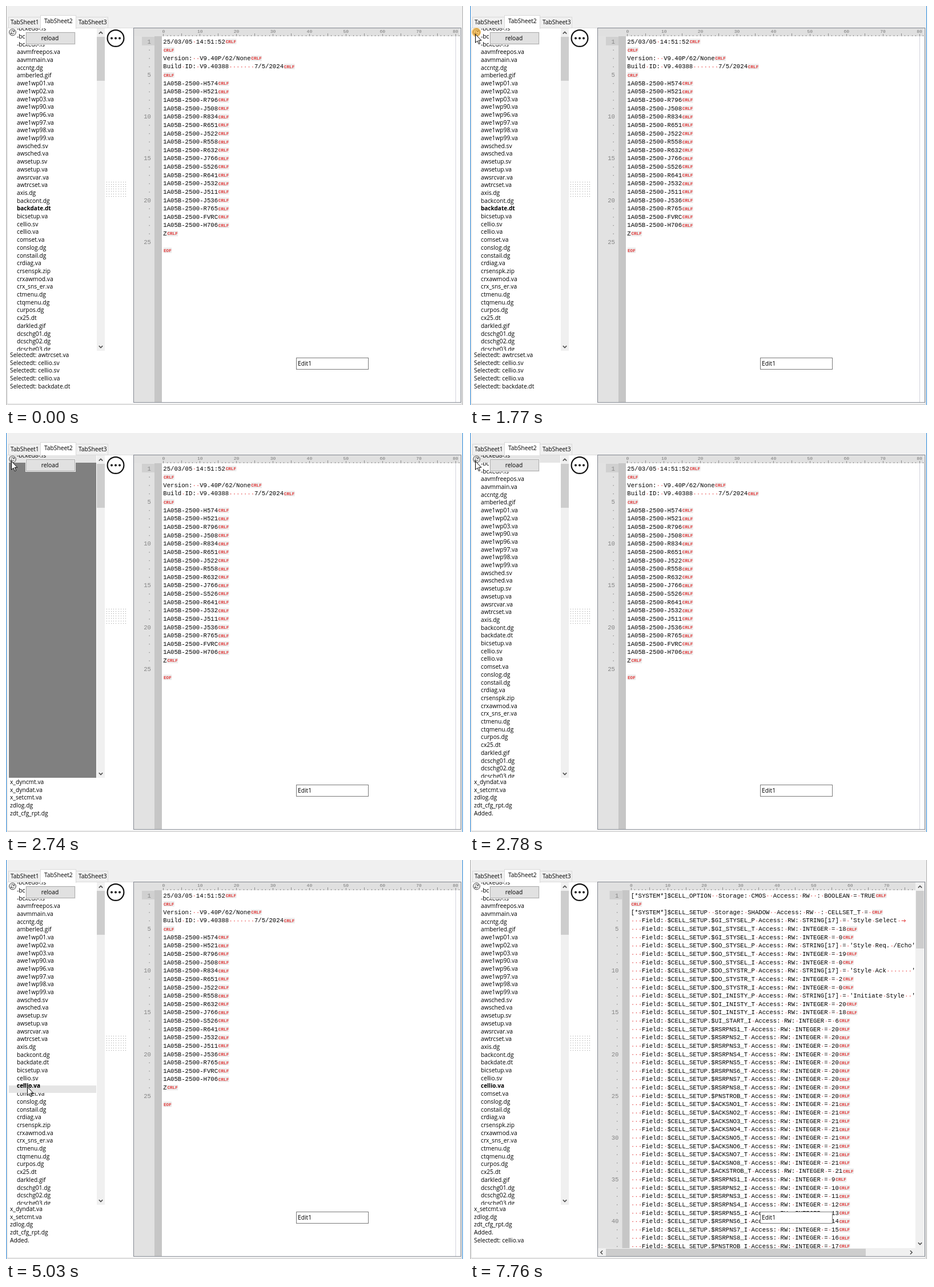
Animation, 802 px wide and 699 px high, one loop 7.83 s. Source, as an HTML page with a canvas:

```html
<!DOCTYPE html>
<html lang="en">
<head>
<meta charset="utf-8">
<title>File list and editor</title>
<style>
  html, body { margin: 0; width: 100%; height: 100%; overflow: hidden; background: #fff; }
  canvas { display: block; }
</style>
</head>
<body>
<canvas id="stage" width="802" height="699"></canvas>
<script>
const ctx = document.getElementById('stage').getContext('2d');
const LOOP = 7830;
const UI = '10.25px "Open Sans", "Noto Sans", sans-serif';
const UI_BOLD = 'bold 10px "Open Sans", "Noto Sans", sans-serif';
const MONO = '10.65px "Liberation Mono", "Courier New", monospace';
const MARK = 'bold 7.7px "Liberation Mono", "Courier New", monospace';
const RULER = '8px "Liberation Mono", "Courier New", monospace';
const COL = 6.39, LINE = 14.63, ROW = 13.7;

const files = ('-bcked8-.ls -bcked9-.ls -bckedt-.ls aavmfreepos.va aavmmain.va accntg.dg amberled.gif ' +
  'awe1wp01.va awe1wp02.va awe1wp03.va awe1wp90.va awe1wp96.va awe1wp97.va awe1wp98.va awe1wp99.va ' +
  'awsched.sv awsched.va awsetup.sv awsetup.va awsrcvar.va awtrcset.va axis.dg backcont.dg backdate.dt ' +
  'bicsetup.va cellio.sv cellio.va comset.va conslog.dg constail.dg crdiag.va crsenspk.zip crxawmod.va ' +
  'crx_sns_er.va ctmenu.dg ctqmenu.dg curpos.dg cx25.dt darkled.gif dcschg01.dg dcschg02.dg dcschg03.dg').split(' ');
const BACKDATE = files.indexOf('backdate.dt'), CELLIO = files.indexOf('cellio.va');

const picked = ['awtrcset.va', 'cellio.sv', 'cellio.sv', 'cellio.va', 'backdate.dt'].map(n => 'Selectedt: ' + n);
const tail = ['x_dyncmt.va', 'x_dyndat.va', 'x_setcmt.va', 'zdlog.dg', 'zdt_cfg_rpt.dg', 'Added.', 'Selectedt: cellio.va'];

const dateDoc = ['25/03/05 14:51:52', '', 'Version:  V9.40P/62/None', 'Build ID: V9.40388       7/5/2024', '',
  ...'H574 H521 R796 J508 R834 R651 J522 R558 R632 J766 S526 R641 J532 J511 J536 R765 FVRC H706'
    .split(' ').map(s => '1A05B-2500-' + s), 'Z'];

const field = (name, value) => `   Field: $CELL_SETUP.$${name} Access: RW: ` +
  (typeof value === 'string' ? `STRING[17] = '${value}` : `INTEGER = ${value}`);
const series = (name, value) => Array.from({ length: 8 }, (_, i) => field(name.replace('#', i + 1), value(i)));
const cellDoc = [
  '[*SYSTEM*]$CELL_OPTION  Storage: CMOS  Access: RW  : BOOLEAN = TRUE', '',
  '[*SYSTEM*]$CELL_SETUP  Storage: SHADOW  Access: RW  : CELLSET_T = ',
  field('GI_STYSEL_P', 'Style Select \t'), field('GI_STYSEL_T', 18), field('GI_STYSEL_I', 0),
  field('GO_STYSEL_P', "Style Req. /Echo'"), field('GO_STYSEL_T', 19), field('GO_STYSEL_I', 0),
  field('DO_STYSTR_P', "Style Ack       '"), field('DO_STYSTR_T', 2), field('DO_STYSTR_I', 0),
  field('DI_INISTY_P', "Initiate Style  '"), field('DI_INISTY_T', 20), field('DI_INISTY_I', 18),
  field('UI_START_I', 6),
  ...series('RSRPNS#_T', () => 20), field('PNSTROB_T', 20),
  ...series('ACKSNO#_T', () => 21), field('ACKSTROB_T', 21),
  ...series('RSRPNS#_I', i => 9 + i), field('PNSTROB_I', 17)
];

function box(x, y, w, h, fill, edge) {
  if (fill) { ctx.fillStyle = fill; ctx.fillRect(x, y, w, h); }
  if (edge) { ctx.strokeStyle = edge; ctx.lineWidth = 1; ctx.strokeRect(x + .5, y + .5, w - 1, h - 1); }
}

function text(s, x, y, font = UI, color = '#000', align = 'left') {
  ctx.font = font;
  ctx.fillStyle = color;
  ctx.textAlign = align;
  ctx.fillText(s, x, y);
}

function clipped(x, y, w, h, draw) {
  ctx.save();
  ctx.beginPath();
  ctx.rect(x, y, w, h);
  ctx.clip();
  draw();
  ctx.restore();
}

function disc(x, y, r, color) {
  ctx.beginPath();
  ctx.arc(x, y, r, 0, 7);
  ctx.fillStyle = color;
  ctx.fill();
}

function path(points, color, width) {
  ctx.beginPath();
  points.forEach(([x, y]) => ctx.lineTo(x, y));
  ctx.strokeStyle = color;
  ctx.lineWidth = width;
  ctx.stroke();
}

// Scroll arrow pointing along (dx, dy)
function chevron(x, y, dx, dy) {
  const a = 3.2, b = 1.6;
  path([[x - dy * a - dx * b, y - dx * a - dy * b], [x + dx * b, y + dy * b],
        [x + dy * a - dx * b, y + dx * a - dy * b]], '#505050', 1.6);
}

function drawWindow(active) {
  box(0, 0, 802, 699, '#fff');
  box(0, 0, 800, 699, '#f0f0f0');
  box(2, 38, 796, 660, '#fff', '#dcdcdc');
  box(4, 19, 57, 20, '#f0f0f0', '#d9d9d9');
  box(122, 19, 57, 20, '#f0f0f0', '#d9d9d9');
  box(60, 16, 63, 24, '#fff', '#d9d9d9');
  box(61, 38, 61, 3, '#fff');
  text('TabSheet1', 8, 32);
  text('TabSheet2', 67, 30);
  text('TabSheet3', 127, 32);
  const edge = active ? '#2585d8' : '#aaaaaa';
  box(0, 0, 1, 699, edge);
  box(799, 0, 1, 699, edge);
  box(2, 697, 796, 1, '#c4c4c4');
}

function drawList(t) {
  const loading = t >= 2560 && t < 2780;
  const bold = t < 2560 ? BACKDATE : t >= 4930 ? CELLIO : -1;
  const hot = t < 2560 || t >= 7760 ? -1 : t < 4930 ? 0 : CELLIO;
  const row = i => text(files[i], 19, 43.2 + i * ROW, i === bold ? UI_BOLD : UI);
  clipped(5, 39, 154, 565, () => {
    files.forEach((_, i) => row(i));
    if (loading) box(5, 52, 153, 552, '#808080');
    if (hot >= 0) {
      box(5, hot ? 395 : 38, 153, hot ? 13 : 14, '#e5e5e5');
      row(hot);
    }
  });
  box(159, 39, 14, 565, '#f0f0f0');
  box(159, 54, 14, 77, '#cdcdcd');
  chevron(166, 47, 0, -1);
  chevron(166, 597, 0, 1);
}

function drawLog(t) {
  let lines = picked;
  if (t >= 5560) lines = tail.slice(2);
  else if (t >= 2780) lines = tail.slice(1, 6);
  else if (t >= 2740) lines = tail.slice(0, 5);
  else if (t >= 2560) {
    const from = Math.floor((t - 2560) / 36) * 8;
    lines = files.slice(from, from + 5);
  }
  lines.forEach((s, i) => text(s, 7, 615 + i * ROW));
}

function drawTools() {
  // Refresh icon
  disc(11.5, 46, 6.5, 'rgba(255,255,255,.75)');
  ctx.strokeStyle = '#333';
  ctx.lineWidth = 1;
  for (const [r, a, b] of [[5.8, 0, 6.3], [3, .4, 2.6], [3, 3.5, 5.8]]) {
    ctx.beginPath();
    ctx.arc(11.5, 46, r, a, b);
    ctx.stroke();
  }
  path([[14.5, 42.5], [14.5, 45], [12, 45]], '#333', 1);
  path([[8.5, 49.5], [8.5, 47], [11, 47]], '#333', 1);

  box(34, 45, 88, 23, '#f4f4f4');
  box(35, 46, 86, 21, '#e1e1e1', '#adadad');
  text('reload', 77, 60.3, UI, '#000', 'center');

  disc(192, 56.5, 15.5, '#111');
  disc(192, 56.5, 13.3, '#fff');
  for (const x of [185, 192, 199]) disc(x, 56.5, 2, '#111');

  for (let y = 0; y < 7; y++)
    for (let x = 0; x < 9; x++) box(Math.round(176 + x * 4.1), Math.round(308 + y * 4.1), 1, 1, '#999');
}

function mark(s, x, y) {
  const w = s.length * 4.62;
  box(x + .5, y - 4.5, w + .5, 9.5, '#ececec');
  text(s, x + .7, y + 3, MARK, '#e23b3b');
}

function codeLine(s, x, y) {
  text(s.replace('\t', ' '), x, y + 3.6, MONO);
  [...s].forEach((c, i) => {
    const cx = x + i * COL;
    if (c === ' ') box(cx + 2.6, y + .2, 1.3, 1.3, '#e23030');
    if (c === '\t') {
      path([[cx + 1, y + .5], [cx + 8, y + .5]], '#e23030', 1);
      path([[cx + 5.5, y - 2], [cx + 8, y + .5], [cx + 5.5, y + 3]], '#e23030', 1);
    }
  });
  if (!s.includes('\t')) mark('CRLF', x + s.length * COL, y);
}

function drawEditor(long) {
  const doc = long ? cellDoc : dateDoc;
  const shift = long ? 6.5 : 0;
  const left = 275.3 + shift;
  const right = long ? 780 : 795, bottom = long ? 680 : 694;
  box(223, 38, 574, 657, '#fff', '#828790');
  clipped(224, 39, right - 224, bottom - 39, () => {
    box(224, 39, 37 + shift, 660, '#e2e2e2');
    box(260 + shift, 53, 13, 650, '#c6c6c6');
    if (!long) box(787, 53, 1, 650, '#d4d4dc');

    box(224, 39, 580, 14, '#e0e0e0');
    for (let c = 0; c <= 82; c++) {
      const h = c % 5 ? 2 : c % 10 ? 5 : 4;
      box(Math.round(left + c * COL), 53 - h, 1, h, '#8c8c8c');
      if (c % 10 === 0) text(c, left + c * COL + .5, 47, RULER, '#777', 'center');
    }

    box(238 + shift, 54, 22, 15, '#d0d0d0');
    const count = long ? doc.length : 25;
    for (let n = 1; n <= count; n++) {
      const y = 62 + (n - 1) * LINE;
      if (n === 1 || n % 5 === 0) text(n, 254 + shift, y + 3.6, MONO, '#858585', 'right');
      else box(250.5 + shift, y, 1.3, 1.3, '#858585');
    }
    doc.forEach((s, i) => codeLine(s, left, 62 + i * LINE));
    if (!long) mark('EOF', left, 62 + 25 * LINE);
  });

  if (long) {
    box(780, 39, 16, 655, '#f0f0f0');
    box(224, 680, 572, 14, '#f0f0f0');
    box(781, 54, 14, 101, '#cdcdcd');
    box(238, 681, 455, 13, '#cdcdcd');
    chevron(788, 47, 0, -1);
    chevron(788, 672, 0, 1);
    chevron(230.5, 687.5, -1, 0);
    chevron(772.5, 687.5, 1, 0);
  }
  box(508, 616, 127, 21, '#fff', '#7a7a7a');
  text('Edit1', 511, 630);
}

const mix = (a, b, p) => [a[0] + (b[0] - a[0]) * p, a[1] + (b[1] - a[1]) * p];
const easeOut = p => 1 - (1 - p) ** 2;
const easeIn = p => p ** 1.6;
// Progress in discrete pointer samples
const steps = (t, start, len, n) => Math.min(n - 1, Math.floor((t - start) / (len / (n - 1)) + 1e-6));

function pointer(t) {
  const rest = [9, 49], peak = [72, 321], item = [37, 397];
  if (t < 160 || t >= 6480) return null;
  if (t < 980) return mix([711, 665], [5, 53], easeOut(steps(t, 160, 780, 23) / 22));
  if (t < 3750) return mix([5, 53], rest, (steps(t, 980, 160, 5) + 1) / 5);
  if (t < 6230) {
    const k = steps(t, 3750, 780, 23) + 1;
    if (k <= 9) return mix(rest, peak, 1 - (1 - k / 9) ** 1.5);
    return mix(peak, item, easeOut((k - 9) / 14));
  }
  return mix(item, [652, 695], easeIn((steps(t, 6230, 250, 8) + 1) / 7));
}

function drawPointer([x, y], click) {
  if (click) disc(x + 2, y - 3, 8, 'rgba(245,170,30,.62)');
  ctx.beginPath();
  for (const [px, py] of [[0, 0], [0, 14.8], [3.4, 11.6], [5.9, 17.2], [8.1, 16.2], [5.7, 10.8], [10.3, 10.8]])
    ctx.lineTo(x + .5 + px, y + .5 + py);
  ctx.closePath();
  ctx.fillStyle = '#fff';
  ctx.fill();
  ctx.strokeStyle = '#000';
  ctx.lineWidth = 1;
  ctx.stroke();
}

function draw(t) {
  drawWindow(t >= 1770 && t < 7760);
  drawList(t);
  drawLog(t);
  drawTools();
  drawEditor(t >= 5560);
  const p = pointer(t);
  const click = (t >= 1770 && t < 1870) || (t >= 4930 && t < 5030);
  if (p) drawPointer(p, click);
}

const start = performance.now();
function frame() {
  draw((performance.now() - start) % LOOP);
  requestAnimationFrame(frame);
}
frame();
</script>
</body>
</html>
```
